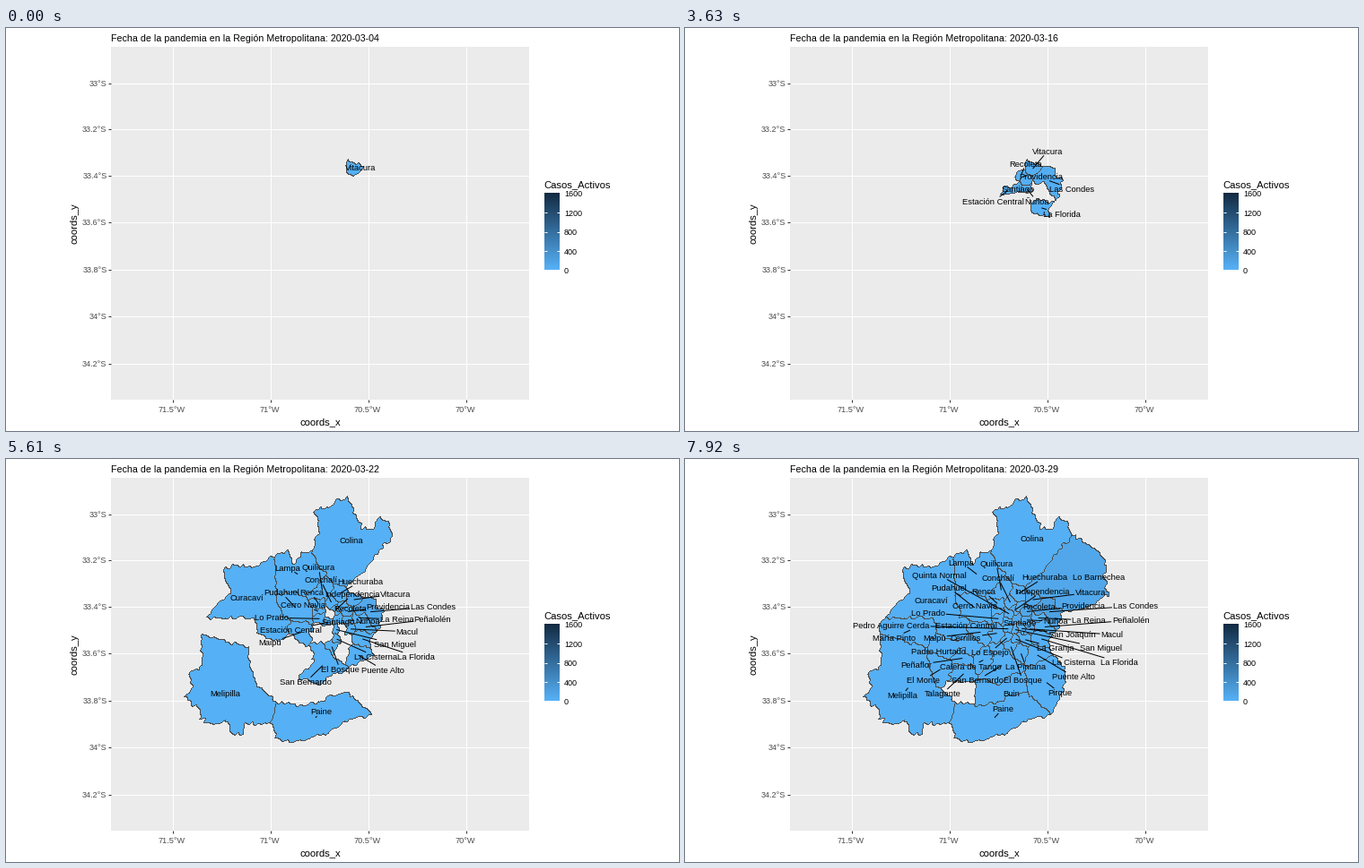
Recreate the animation shown at these times as a matplotlib script. Size 750 by 450 pixels, loop 8 s.

```python
import matplotlib.pyplot as plt
import numpy as np
from matplotlib.animation import FuncAnimation
from matplotlib.collections import LineCollection
from matplotlib.patches import Rectangle
from matplotlib.path import Path

W, H, DPI = 750, 450, 100
INTERVAL, FRAMES, STEP = 40, 200, 330
STEPS = 25
PX = 72 / DPI
LIGHT = np.array([0x56, 0xB1, 0xF7])
DARK = np.array([0x13, 0x2B, 0x43])
BORDER = (0x4D, 0x4D, 0x4D)
MAX_CASES = 1600
LEFT, TOP, RIGHT, BOTTOM = 190, 35, 490, 325
ROW = 14

plt.rcParams["font.family"] = "Liberation Sans"
fig = plt.figure(figsize=(W / DPI, H / DPI), dpi=DPI, facecolor="white")
ax = fig.add_axes([0, 0, 1, 1])
ax.axis("off")


def text(x, y, s, size, color="black", ha="left", **kw):
    kw.setdefault("va", "baseline")
    return ax.text(x, y, s, fontsize=size * PX, color=color, ha=ha, **kw)


def line(x0, y0, x1, y1, color, z=2):
    ax.plot([x0, x1], [y0, y1], color=color, lw=PX, zorder=z,
            solid_capstyle="butt")


# ---- communes: first step, label place on the full map, seed points -------

names, starts, homes, cases, seeds, owners = [], [], [], [], [], []


def commune(name, start, home, *points, peak=20):
    for p in points:
        seeds.append(p)
        owners.append(len(names))
    names.append(name)
    starts.append(start)
    homes.append(home)
    cases.append(peak)


commune("Vitacura", 0, (452, 149), (389, 158), peak=110)
commune("Providencia", 1, (444, 164), (380, 172), peak=110)
commune("Las Condes", 4, (502, 164), (394, 168), (404, 166), (412, 176), peak=180)
commune("Ñuñoa", 7, (413, 181), (381, 180), peak=110)
commune("Santiago", 9, (373, 183), (369, 179), peak=110)
commune("Estación Central", 10, (313, 184), (359, 182))
commune("La Florida", 10, (484, 227), (396, 200))
commune("Recoleta", 11, (395, 165), (373, 165))
commune("Peñalolén", 12, (497, 180), (398, 186))
commune("Huechuraba", 13, (401, 132), (371, 155))
commune("Maipú", 13, (278, 199), (330, 193))
commune("Puente Alto", 13, (433, 243), (391, 217))
commune("San Bernardo", 13, (326, 247), (352, 218), (347, 238), (362, 232))
commune("Colina", 14, (387, 89), (388, 95), (362, 107), (378, 128))
commune("Renca", 14, (333, 148), (351, 164))
commune("Conchalí", 14, (349, 133), (365, 161))
commune("Independencia", 14, (398, 148), (367, 168))
commune("La Cisterna", 14, (433, 227), (368, 201))
commune("Curacaví", 15, (274, 153), (291, 141), (294, 167), (258, 165), (302, 192))
commune("Cerro Navia", 15, (323, 164), (350, 170))
commune("El Bosque", 15, (376, 247), (366, 208))
commune("San Miguel", 15, (463, 211), (368, 191))
commune("Paine", 15, (354, 279), (308, 286), (345, 284), (372, 274))
commune("Lampa", 16, (308, 118), (311, 141), (330, 120), (338, 138))
commune("Quilicura", 16, (347, 117), (352, 150))
commune("Pudahuel", 16, (294, 149), (314, 160), (333, 172))
commune("Macul", 16, (476, 196), (382, 188))
commune("La Reina", 17, (450, 180), (393, 178))
commune("Lo Prado", 17, (271, 169), (352, 176))
commune("Melipilla", 17, (242, 264), (250, 221), (263, 238), (290, 280))
commune("San Joaquín", 18, (431, 196), (375, 189))
commune("La Granja", 18, (413, 211), (376, 201))
commune("Padre Hurtado", 18, (283, 215), (318, 210), (293, 212))
commune("Calera de Tango", 18, (318, 232), (333, 224))
commune("Pedro Aguirre Cerda", 19, (230, 184), (361, 190))
commune("Lo Espejo", 19, (340, 216), (361, 198))
commune("Peñaflor", 19, (258, 230), (309, 222))
commune("Talagante", 19, (287, 262), (309, 238))
commune("Quinta Normal", 20, (283, 133), (361, 174))
commune("Cerrillos", 20, (313, 199), (351, 193))
commune("La Pintana", 20, (380, 232), (374, 213))
commune("María Pinto", 21, (233, 199), (258, 191))
commune("El Monte", 21, (265, 247), (286, 232))
commune("Buin", 21, (364, 262), (340, 262), (368, 252))
commune("Pirque", 22, (418, 261), (395, 250), (400, 237))
commune("Lo Barnechea", 23, (461, 132), (428, 130), (394, 146), (412, 146),
        (424, 160), peak=110)

VOID = len(names)
seeds.append((309, 260))
owners.append(VOID)

REGION = Path([
    (382, 44), (389, 62), (397, 78), (408, 79), (417, 66), (425, 70),
    (431, 84), (458, 101), (471, 118), (467, 135), (473, 150), (455, 165),
    (418, 172), (418, 185), (405, 205), (408, 216), (425, 236), (423, 255),
    (409, 286), (380, 292), (358, 307), (318, 317), (303, 313), (297, 296),
    (268, 296), (263, 307), (252, 308), (248, 294), (232, 297), (216, 290),
    (218, 281), (200, 267), (210, 253), (202, 240), (219, 232), (217, 185),
    (234, 165), (250, 150), (243, 127), (250, 119), (280, 121), (295, 111),
    (313, 103), (322, 118), (330, 105), (341, 104), (349, 82), (346, 58),
    (363, 53), (368, 47)])


def wobble(x, y, rng):
    """Sum of random waves that makes the borders ragged."""
    total = 0
    for _ in range(14):
        k, turn, phase = rng.uniform((0.3, 0, 0), (1.1, 6.28, 6.28))
        total = total + 0.35 * np.sin(k * (x * np.cos(turn) + y * np.sin(turn)) + phase)
    return total


def owner_map():
    """Commune of each pixel: nearest seed inside the region."""
    rng = np.random.default_rng(7)
    x, y = np.meshgrid(np.arange(LEFT, RIGHT) + 0.5, np.arange(TOP, BOTTOM) + 0.5)
    x, y = x + wobble(x, y, rng), y + wobble(x, y, rng)
    dist = np.array([(x - sx) ** 2 + (y - sy) ** 2 for sx, sy in seeds])
    inside = REGION.contains_points(np.c_[x.ravel(), y.ravel()]).reshape(x.shape)
    return np.where(inside, np.array(owners)[dist.argmin(0)], VOID)


owner = owner_map()
right, below = np.roll(owner, -1, 1), np.roll(owner, -1, 0)
edge = (owner != right) | (owner != below)
anchors = np.array([np.argwhere(owner == i).mean(0)[::-1] + (LEFT + 0.5, TOP + 0.5)
                    for i in range(VOID)])
starts, homes, cases = np.array(starts), np.array(homes, float), np.array(cases)

# ---- panel, axes and legend -----------------------------------------------

ax.add_patch(Rectangle((117, 21), 466, 394, color="#EBEBEB", lw=0, zorder=1))
for i, s in enumerate(("71.5", "71", "70.5", "70")):
    x = 185.5 + 109 * i
    line(x, 21, x, 415, "white")
    line(x, 415, x, 418, "#333333")
    text(x - 0.5, 429.3, s + "°W", 9.2, "#4D4D4D", "center")
for i in range(7):
    y = int(61 + 51.6 * i + 0.1 * i * i) + 0.5
    line(117, y, 583, y, "white")
    line(114, y, 117, y, "#333333")
    text(112.5, y + 3.7, f"{33 + 0.2 * i:.3g}°S", 9.1, "#4D4D4D", "right")
text(350, 443, "coords_x", 11.3, ha="center")
text(77, 218, "coords_y", 11.3, ha="center", va="center", rotation=90)

text(599, 178, "Casos_Activos", 11.2)
ramp = np.linspace(DARK, LIGHT, 86)[:, None, :] / 255
ax.imshow(ramp, extent=(600, 617, 270, 184), aspect="auto", zorder=2,
          interpolation="nearest")
for i in range(5):
    y = 270.5 - i * 21.5
    if 0 < i < 4:
        line(600, y, 603.4, y, "white", 3)
        line(613.6, y, 617, y, "white", 3)
    text(622, y + 3.7, str(400 * i), 9)

# ---- moving parts ---------------------------------------------------------

title = text(117, 15, "", 10.65)
chart = ax.imshow(np.zeros(owner.shape + (4,), np.uint8), aspect="auto", zorder=4,
                  extent=(LEFT, RIGHT, BOTTOM, TOP), interpolation="nearest")
leaders = ax.add_collection(LineCollection([], colors="black", linewidths=PX, zorder=5))
ax.set_xlim(0, W)
ax.set_ylim(H, 0)
labels = [text(0, 0, n, 9.4, ha="center", zorder=6) for n in names]
half = np.array([t.get_window_extent().width / 2 for t in labels])


def paint(step):
    """Filled communes with thin borders, clear elsewhere."""
    active = np.append(starts <= step, False)
    share = cases * ((step + 1) / STEPS) ** 2 / MAX_CASES
    fill = LIGHT + (DARK - LIGHT) * np.append(share, 0)[:, None]
    img = np.zeros(owner.shape + (4,), np.uint8)
    img[..., :3] = fill[owner]
    drawn = edge & (active[owner] | active[right] | active[below])
    img[drawn, :3] = BORDER
    img[..., 3] = 255 * (active[owner] | drawn)
    return img


def repel(pos, width):
    """Push overlapping labels apart along their smaller overlap."""
    order = np.arange(len(pos))
    tie = 1e-6 * (order[:, None] - order)
    for _ in range(120):
        dx = pos[:, None, 0] - pos[None, :, 0] + tie
        dy = pos[:, None, 1] - pos[None, :, 1] + tie
        ox = width[:, None] + width - np.abs(dx)
        oy = ROW - np.abs(dy)
        hit = (ox > 0) & (oy > 0) & (tie != 0)
        pos[:, 0] += 0.25 * (hit * (ox < oy) * ox * np.sign(dx)).sum(1)
        pos[:, 1] += 0.25 * (hit * (ox >= oy) * oy * np.sign(dy)).sum(1)
    return pos


def place(step):
    """Labels drift outwards as the map fills up."""
    shown = np.flatnonzero(starts <= step)
    spread = 0.1 + 0.9 * len(shown) / VOID
    pos = anchors[shown] + (homes[shown] - anchors[shown]) * spread
    return shown, repel(pos, half[shown])


def leader(pos, anchor, width):
    d = anchor - pos
    k = max(abs(d[0]) / (width + 1), abs(d[1]) / 5)
    return [pos + d / k, anchor] if k > 1.3 else None


def scene(step):
    shown, pos = place(step)
    lines = [leader(p, anchors[i], half[i]) for i, p in zip(shown, pos)]
    return paint(step), shown, pos, [s for s in lines if s]


scenes = [scene(step) for step in range(STEPS)]


def update(frame):
    step = (frame * INTERVAL + INTERVAL - 1) // STEP
    day = 4 + step + (step >= 10)
    title.set_text(f"Fecha de la pandemia en la Región Metropolitana: 2020-03-{day:02d}")
    img, shown, pos, segments = scenes[step]
    chart.set_data(img)
    leaders.set_segments(segments)
    for t in labels:
        t.set_visible(False)
    for i, (x, y) in zip(shown, pos):
        labels[i].set_visible(True)
        labels[i].set_position((x, y + 3.3))
    return []


anim = FuncAnimation(fig, update, frames=FRAMES, interval=INTERVAL,
                     init_func=lambda: update(0), repeat=True, repeat_delay=0)
plt.show()
```
